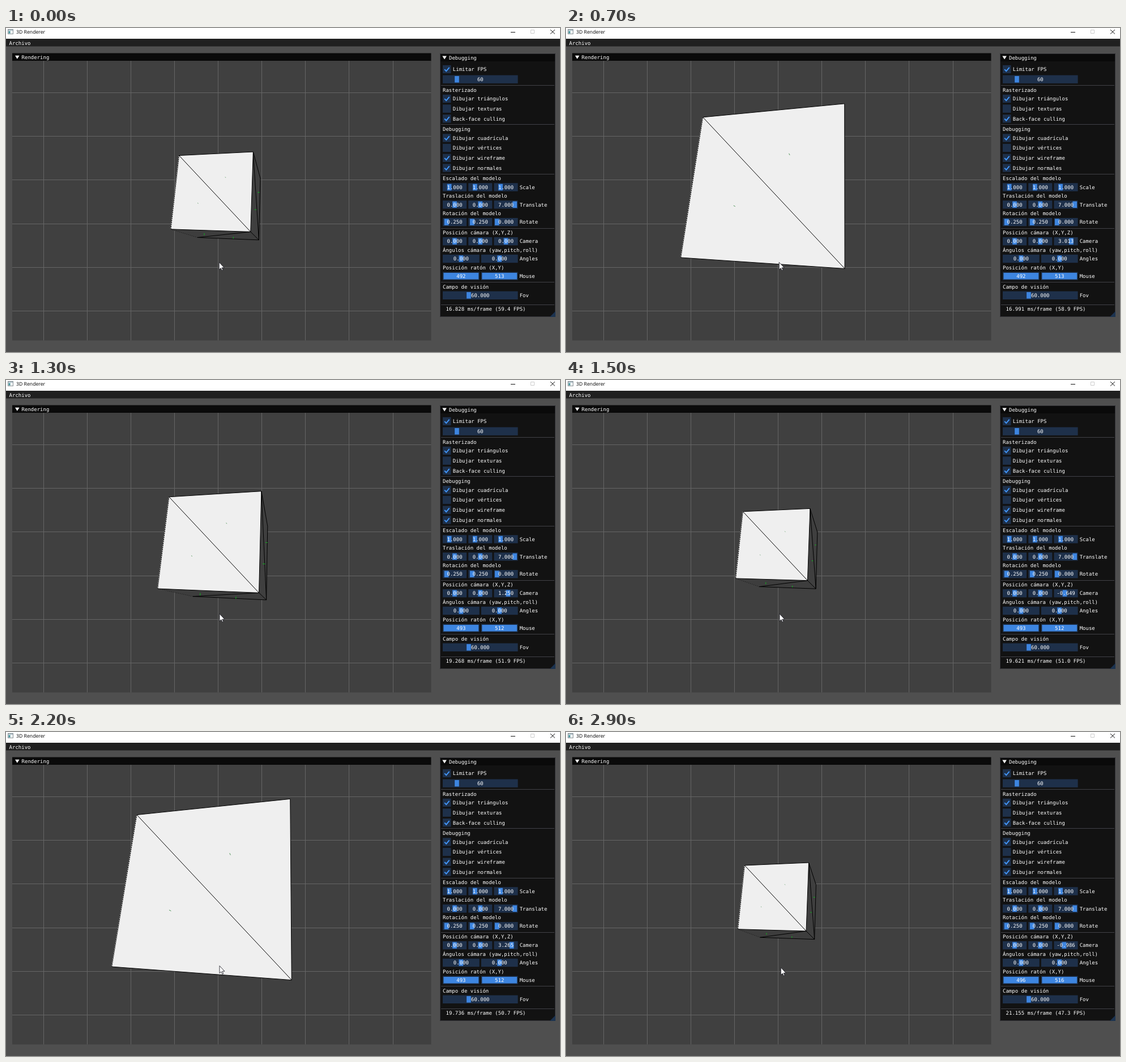
Recreate the animation shown at these times as an HTML page. Size 978 px wide and 573 px high, loop 3 s.

```html
<!DOCTYPE html>
<html lang="es">
<head>
<meta charset="utf-8">
<title>3D Renderer</title>
<style>
html, body { margin: 0; width: 100%; height: 100%; overflow: hidden; background: #4f4f4f; }
svg { display: block; width: 978px; height: 573px; }
text { font: 9px "DejaVu Sans Mono", monospace; fill: #fff; text-rendering: geometricPrecision; white-space: pre; }
.title { font: 8.7px "Open Sans", sans-serif; fill: #000; }
.mid { text-anchor: middle; }
</style>
</head>
<body>
<svg id="stage" viewBox="0 0 978 573"></svg>
<script>
const stage = document.getElementById('stage');

function add(tag, attrs, content) {
  const el = document.createElementNS('http://www.w3.org/2000/svg', tag);
  for (const k in attrs) el.setAttribute(k, attrs[k]);
  if (content !== undefined) el.textContent = content;
  stage.appendChild(el);
  return el;
}
const rect = (x, y, width, height, fill) => add('rect', { x, y, width, height, fill });
const path = (d, stroke, width = 1, fill = 'none') =>
  add('path', { d, stroke, 'stroke-width': width, fill });
// y is the middle of the line of text
const label = (x, y, s, cls = '') => add('text', { x, y: y + 3.2, class: cls }, s);

// ---- window frame and menu ----
function drawWindow() {
  rect(0, 0, 978, 573, '#4f4f4f');
  rect(0, 0, 978, 19, '#fff');
  rect(3.5, 2.5, 9, 8, '#f4f6f7').setAttribute('stroke', '#8a9296');
  rect(4, 3, 8, 1.5, '#9fb4bd');
  rect(4.5, 5.5, 3, 4, '#3f8f96');
  label(18, 7, '3D Renderer', 'title');
  path('M891 7.5h8', '#111');
  path('M926.5 3.5h6v6h-6z', '#ccc');
  path('M961 3l8 7.5M969 3l-8 7.5', '#111');
  rect(0, 19, 978, 13.5, '#202020');
  label(5.6, 26.5, 'Archivo');
}

// ---- viewport ----
const view = { x: 11, y: 58, w: 739.5, h: 494.5 };

function drawViewport() {
  rect(view.x, 44.5, view.w, 14, '#0a0a0a');
  path('M16 48.8h7.6l-3.8 6z', 'none', 0, '#fff');
  label(27.6, 51.8, 'Rendering');
  rect(view.x, view.y, view.w, view.h, '#404040');
  let d = '';
  for (let i = 0; i < 9; i++) d += `M${Math.floor(66.3 + 77.1 * i) + .5} 58V552.5`;
  for (let i = 0; i < 6; i++) d += `M11 ${Math.floor(114.4 + 77.2 * i) + .5}H750.5`;
  path(d, '#656565');
}

// ---- cube ----
const SIN = Math.sin(.25), COS = Math.cos(.25);
const FOCAL = 247 * Math.sqrt(3);

function project([x, y, z], cam) {
  const y1 = y * COS - z * SIN, z1 = y * SIN + z * COS;
  const x2 = x * COS + z1 * SIN, z2 = z1 * COS - x * SIN;
  const k = FOCAL / (7 + z2 - cam);
  return [380.5 + x2 * k, 305 - y1 * k];
}

// corners run clockwise on screen; the diagonal joins the first and third
const faces = [
  { n: [1, 0, 0], fill: '#3f3f3f', pts: [[1, 1, -1], [1, 1, 1], [1, -1, 1], [1, -1, -1]] },
  { n: [0, -1, 0], fill: '#3d3d3d', pts: [[1, -1, -1], [1, -1, 1], [-1, -1, 1], [-1, -1, -1]] },
  { n: [0, 0, -1], fill: '#efefef', pts: [[-1, 1, -1], [1, 1, -1], [1, -1, -1], [-1, -1, -1]] }
];

const seg = (a, b) => `M${a[0].toFixed(2)} ${a[1].toFixed(2)}L${b[0].toFixed(2)} ${b[1].toFixed(2)}`;

function makeCube() {
  for (const f of faces) f.area = path('', 'none', 0, f.fill);
  const rim = path('', '#e4e4e4', 1.2);
  const wire = path('', '#000', 1);
  const dotted = path('', '#000', 1);
  dotted.setAttribute('stroke-dasharray', '2.4 1.2');
  const faint = path('', '#111', .8);
  faint.setAttribute('stroke-dasharray', '1.2 2');
  const sideNormals = path('', '#0fae1c', 1.1);
  const frontNormals = path('', '#3a8a44', .9);

  return cam => {
    let lines = '', side = '', front = '', weak = '', left = '';
    for (const f of faces) {
      const p = f.pts.map(v => project(v, cam));
      const isFront = f.n[2] !== 0;
      const turn = (p[1][0] - p[0][0]) * (p[2][1] - p[0][1]) - (p[1][1] - p[0][1]) * (p[2][0] - p[0][0]);
      f.area.setAttribute('d', turn > 0 ? 'M' + p.map(q => q.join(' ')).join('L') + 'Z' : '');
      if (turn <= 0) continue;
      lines += seg(p[0], p[1]) + seg(p[1], p[2]) + seg(p[0], p[2]);
      if (isFront) { lines += seg(p[2], p[3]); left = seg(p[3], p[0]); }
      else if (f.n[1]) weak = seg(p[2], p[3]);
      for (const tri of [[0, 1, 2], [0, 2, 3]]) {
        const mid = [0, 1, 2].map(a => tri.reduce((s, i) => s + f.pts[i][a], 0) / 3);
        const tip = mid.map((v, a) => v + .05 * f.n[a]);
        const mark = seg(project(mid, cam), project(tip, cam));
        if (isFront) front += mark; else side += mark;
      }
    }
    rim.setAttribute('d', left);
    dotted.setAttribute('d', left);
    wire.setAttribute('d', lines);
    faint.setAttribute('d', weak);
    sideNormals.setAttribute('d', side);
    frontNormals.setAttribute('d', front);
  };
}

// ---- debugging panel ----
const LEFT = 771, WIDTH = 132.6, GAP = 3.1, ROW = 14.4, GRAB = 7.7;
const BLUE = '#3d85e0', FRAME = '#1e304a';

function slider(x, y, w, text, part) {
  rect(x, y - ROW / 2, w, ROW, FRAME);
  const full = part === 'full';
  const gx = p => x + 1.5 + p * (w - 3.1 - GRAB);
  const grab = rect(full ? x + 1.5 : gx(part), y - ROW / 2 + 1.5, full ? w - 3 : GRAB, ROW - 3, BLUE);
  const value = label(x + w / 2, y, text, 'mid');
  return (s, p) => {
    value.textContent = s;
    if (p !== undefined) grab.setAttribute('x', gx(p));
  };
}

function sliders(y, name, items) {
  const w = (WIDTH - GAP * (items.length - 1)) / items.length;
  if (name) label(LEFT + WIDTH + GAP, y, name);
  return items.map(([text, part], i) => slider(LEFT + i * (w + GAP), y, w, text, part));
}

function check(y, name, on) {
  rect(LEFT, y - 7.2, 14.5, 14.4, FRAME);
  if (on) path(`M${LEFT + 3.2} ${y + .2}l3 3.2l5.4 -6.6`, '#4296fa', 1.9);
  label(788.8, y, name);
}

function drawPanel() {
  rect(766, 45, 204, 466, '#121212');
  rect(766, 45, 204, 14, '#0a0a0a');
  path('M766.5 45.5h203v465h-203z', '#333338');
  path('M770.3 49.5h7.6l-3.8 6z', 'none', 0, '#fff');
  label(782, 52.5, 'Debugging');
  for (const y of [101, 170, 258, 354, 449, 489]) path(`M768 ${y + .5}H968`, '#414147');

  check(73, 'Limitar FPS', true);
  sliders(90.7, '', [['60', .161]]);
  label(LEFT, 109.7, 'Rasterizado');
  check(125, 'Dibujar triángulos', true);
  check(142.6, 'Dibujar texturas', false);
  check(160.3, 'Back-face culling', true);
  label(LEFT, 179, 'Debugging');
  check(194.5, 'Dibujar cuadrícula', true);
  check(212, 'Dibujar vértices', false);
  check(229.8, 'Dibujar wireframe', true);
  check(247.5, 'Dibujar normales', true);

  label(LEFT, 266, 'Escalado del modelo');
  sliders(281.5, 'Scale', Array(3).fill(['1.000', .2]));
  label(LEFT, 297, 'Traslación del modelo');
  sliders(312.3, 'Translate', [['0.000', .5], ['0.000', .5], ['7.000', 1]]);
  label(LEFT, 327.8, 'Rotación del modelo');
  sliders(343.2, 'Rotate', [['0.250', .04], ['0.250', .04], ['0.000', 0]]);
  label(LEFT, 361.8, 'Posición cámara (X,Y,Z)');
  const camera = sliders(377.2, 'Camera', Array(3).fill(['0.000', .5]))[2];
  label(LEFT, 392.7, 'Ángulos cámara (yaw,pitch,roll)');
  sliders(408, 'Angles', Array(2).fill(['0.000', .5]));
  label(LEFT, 423.5, 'Posición ratón (X,Y)');
  const [mouseX, mouseY] = sliders(438.7, 'Mouse', [['492', 'full'], ['513', 'full']]);
  label(LEFT, 457.5, 'Campo de visión');
  sliders(472.8, 'Fov', [['60.000', 1 / 3]]);
  const rate = label(776.6, 496.8, '');
  path('M970 501v10h-10z', 'none', 0, '#1c3350');
  return { camera, mouseX, mouseY, rate };
}

// ---- motion ----
const camKeys = [[0, 0], [600, 2.46], [700, 3.013], [1100, 3.821], [1200, 2.46], [1300, 1.25],
  [1400, .2], [1500, -.649], [1700, -1.05], [1800, -.9], [1900, -.3], [2000, .842],
  [2200, 3.265], [2400, 3.265], [2900, -.986]];
const rateKeys = [[0, 16.828], [700, 16.991], [1100, 18.915], [1500, 19.621],
  [2000, 19.58], [2200, 19.736], [2900, 21.155]];

function at(keys, t) {
  let i = 1;
  while (i < keys.length - 1 && keys[i][0] < t) i++;
  const [t0, a] = keys[i - 1], [t1, b] = keys[i];
  return a + (b - a) * (t - t0) / (t1 - t0);
}

drawWindow();
drawViewport();
const setCube = makeCube();
const panel = drawPanel();
const cursor = path('M0 0V13L3 10.3L4.9 14.6L6.8 13.8L4.9 9.6H9z', '#101018', .8, '#fff');

function draw(now) {
  const t = Math.floor(now % 3000 / 100) * 100;
  const cam = at(camKeys, t), ms = at(rateKeys, t);
  const [mx, my] = t < 900 ? [492, 513] : t < 2600 ? [493, 512] : [496, 516];
  setCube(cam);
  panel.camera(cam.toFixed(3), (cam + 5) / 10);
  panel.mouseX(mx);
  panel.mouseY(my);
  panel.rate.textContent = `${ms.toFixed(3)} ms/frame (${(1000 / ms).toFixed(1)} FPS)`;
  cursor.setAttribute('transform', `translate(${376.2 + (mx - 492) * .771} ${414.3 + (my - 513) * .771})`);
}

function tick() {
  draw(performance.now());
  requestAnimationFrame(tick);
}
tick();
</script>
</body>
</html>
```
